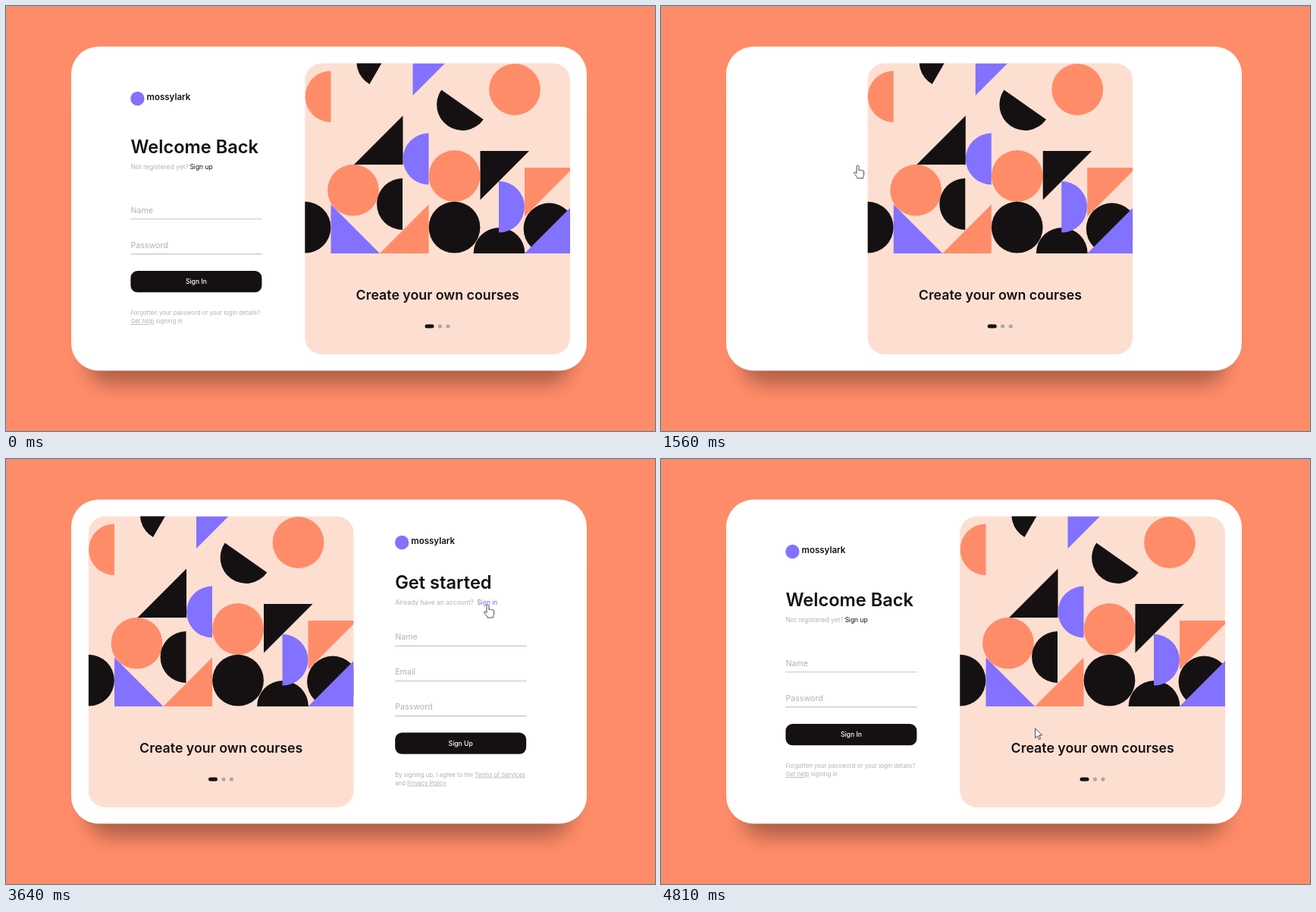
Recreate the animation shown at these times as an HTML page. Size 856 by 560 pixels, loop 4940 ms.

```html
<!DOCTYPE html>
<html lang="en">
<head>
<meta charset="utf-8">
<title>Sign in and sign up</title>
<style>
  html, body { margin: 0; width: 100%; height: 100%; overflow: hidden; background: #ff8c69; }
  svg { display: block; width: 856px; height: 560px; font-family: Inter, "Open Sans", sans-serif; }
  .brand { font-size: 11.5px; font-weight: 600; }
  .title { font-size: 23.6px; font-weight: 600; }
  .slide { font-size: 17.8px; font-weight: 600; }
  .ask, .link { font-size: 8.5px; }
  .field { font-size: 10.7px; }
  .note { font-size: 7.8px; }
  .action { font-size: 8.6px; font-weight: 500; fill: #fff; }
  .ask, .field, .note { fill: #b3b1b3; }
  .brand, .title, .slide { fill: #151112; }
  .action, .slide { text-anchor: middle; }
  .under { text-decoration: underline; }
</style>
</head>
<body>
<svg id="stage" viewBox="0 0 856 560">
  <defs>
    <filter id="blur" x="-10%" y="-20%" width="120%" height="140%">
      <feGaussianBlur stdDeviation="13"/>
    </filter>
    <clipPath id="window"><path d="M394.3 326V97.5a22 22 0 0 1 22-22H722a22 22 0 0 1 22 22V326Z"/></clipPath>
  </defs>
  <rect width="856" height="560" fill="#ff8c69"/>
  <path d="M0 .5H856M.5 0V560" stroke="#cf9a86"/>
  <rect x="107" y="110" width="638" height="388" rx="30" opacity=".32" filter="url(#blur)"/>
  <rect x="86" y="53.5" width="680" height="427" rx="36" fill="#fff"/>
  <g id="login"></g>
  <g id="signup"></g>
  <g id="panel">
    <rect x="394.3" y="75.5" width="349.7" height="383.5" rx="22" fill="#fddfd2"/>
    <g id="art" clip-path="url(#window)"></g>
    <text class="slide" x="569.2" y="387">Create your own courses</text>
    <rect x="552.5" y="419.5" width="12" height="5" rx="2.5" fill="#151112"/>
    <circle cx="572.4" cy="422" r="2.6" fill="#b5a5a2"/>
    <circle cx="583" cy="422" r="2.6" fill="#b5a5a2"/>
  </g>
  <g id="cursor" fill="#fff" stroke="#1b1830" stroke-width=".8" stroke-linejoin="round">
    <path id="arrow" d="M0 0V12.5L3 9.8 5 14.5 7 13.6 5 9H9Z"/>
    <path id="hand" d="M-1.6 1.2a1.5 1.5 0 0 1 3 0V6c.3-.9 2.2-.9 2.5.3.5-.8 2.1-.6 2.3.5.6-.6 1.8-.3 1.8.8v3.9c0 2-1.2 2.8-1.2 5H-.6C-.8 14.5-3 13-4.6 10c-.8-1.4.8-2.2 1.7-1.3L-1.6 10Z"/>
  </g>
</svg>
<script>
const $ = id => document.getElementById(id);
const INK = '#151112', CORAL = '#ff8c69', VIOLET = '#8371ff';
const LOOP = 4940, TICK = 130, LEFT = 164.4, R = 33.9;

// Geometric pattern
const disc = (fill, x, y) => `<circle cx="${x}" cy="${y}" r="${R}" fill="${fill}"/>`;
const tri = (fill, x, y, w, h) => `<path d="M${x} ${y}h${w}L${x} ${y + h}Z" fill="${fill}"/>`;
// Half disc: the left half, turned by an angle
const half = (fill, x, y, turn = 0) =>
  `<path d="M0 ${-R}A${R} ${R} 0 0 0 0 ${R}Z" fill="${fill}" transform="translate(${x} ${y}) rotate(${turn})"/>`;

$('art').innerHTML = [
  half(CORAL, 428.5, 119.3),
  half(INK, 496.4, 73.7, 30),
  tri(VIOLET, 536.5, 75.5, 42.5, 42.5),
  disc(CORAL, 671, 110),
  half(INK, 602, 130, -55),
  tri(INK, 523.5, 209, -64.5, -64.5),
  half(VIOLET, 557.5, 201.5),
  disc(CORAL, 591.5, 224),
  tri(INK, 625.5, 191, 64.5, 64.5),
  tri(CORAL, 684, 213, 64.5, 64.5),
  disc(CORAL, 458, 242.7),
  half(INK, 523, 261),
  disc(INK, 394.5, 291.7),
  tri(VIOLET, 428.5, 326, 64.5, -64.5),
  tri(CORAL, 557.5, 326, -64.5, -64.5),
  disc(INK, 591.5, 291.7),
  disc(INK, 650.5, 326),
  half(VIOLET, 650, 264.7, 180),
  disc(INK, 716.5, 293.5),
  tri(VIOLET, 748.5, 326, -64.5, -64.5)
].join('');

// Forms
const text = (cls, y, str, x = 0) => `<text class="${cls}" x="${LEFT + x}" y="${y}">${str}</text>`;
const under = str => `<tspan class="under">${str}</tspan>`;
const field = (str, y) => text('field', y, str) +
  `<path d="M${LEFT} ${y + 8.2}h173.3" stroke="#c4c2c7" stroke-width="1.1"/>`;

function form(f) {
  return `<circle cx="173.4" cy="${f.logo}" r="9.2" fill="${VIOLET}"/>` +
    text('brand', f.logo + 2, 'mossylark', 21.2) +
    text('title', f.head, f.title) +
    text('ask', f.head + 21, f.ask) +
    text('link', f.head + 21, f.link, f.linkX) +
    f.fields.map((name, i) => field(name, f.first + i * 46.1)).join('') +
    `<rect x="${LEFT}" y="${f.button}" width="173" height="28.3" rx="9" fill="${INK}"/>` +
    text('action', f.button + 17, f.action, 86.5) +
    f.notes.map((note, i) => text('note', f.button + 58 + i * 11, note)).join('');
}

$('login').innerHTML = form({
  logo: 122, head: 194, title: 'Welcome Back',
  ask: 'Not registered yet?', link: 'Sign up', linkX: 78,
  fields: ['Name', 'Password'], first: 272.6, button: 349, action: 'Sign In',
  notes: ['Forgotten your password or your login details?', under('Get help') + ' signing in']
});
$('signup').innerHTML = form({
  logo: 110, head: 171, title: 'Get started',
  ask: 'Already have an account?', link: 'Sign in', linkX: 108,
  fields: ['Name', 'Email', 'Password'], first: 238.2, button: 360.5, action: 'Sign Up',
  notes: ['By signing up, I agree to the ' + under('Terms of Services'), 'and ' + under('Privacy Policy')]
});

const clamp = v => Math.min(1, Math.max(0, v));
const ramp = (t, a, b) => clamp((t - a) / (b - a));

// Ease in and out, as the CSS curve (.42, 0, .58, 1)
function ease(t, a, b) {
  const u = ramp(t, a, b);
  let lo = 0, hi = 1;
  for (let i = 0; i < 24; i++) {
    const s = (lo + hi) / 2, q = 1 - s;
    if (1.26 * s * q * q + 1.74 * s * s * q + s ** 3 < u) lo = s; else hi = s;
  }
  return lo * lo * (3 - 2 * lo);
}

const show = (el, on) => el.setAttribute('visibility', on ? 'visible' : 'hidden');
const move = (el, x, y = 0) => el.setAttribute('transform', `translate(${x.toFixed(2)} ${y.toFixed(2)})`);
const tint = k => `rgb(${[[21, 131], [17, 113], [18, 255]].map(([a, b]) => Math.round(a + (b - a) * k))})`;
const loginLink = $('login').querySelector('.link');
const signupLink = $('signup').querySelector('.link');

function draw(t) {
  const p = ease(t, 1205, 1983) - ease(t, 3602, 4495);
  move($('panel'), -286.5 * p);
  move($('login'), 350 * p);
  move($('signup'), 350 * p);
  show($('login'), p < .5);
  show($('signup'), p >= .5);

  loginLink.setAttribute('fill', tint(ramp(t, 720, 910) - ramp(t, 1130, 1390)));
  signupLink.setAttribute('fill', tint(ramp(t, 2470, 2860) - ramp(t, 3600, 4000)));

  const enter = ease(t, 130, 910), cross = ease(t, 1860, 2345), leave = ease(t, 4180, 4810);
  move($('cursor'), 470 - 210.4 * enter + 376 * cross - 142 * leave,
                    560 - 349.5 * enter - 18 * cross + 162.5 * leave);
  const seen = t >= 260;
  const over = (t >= 780 && t < 1860) || (t >= 2340 && t < 4180);
  show($('hand'), seen && over);
  show($('arrow'), seen && !over);
}

const start = performance.now();
function frame(now) {
  const t = Math.max(0, now - start) % LOOP;
  draw(Math.floor((t + .01) / TICK) * TICK);
  requestAnimationFrame(frame);
}
draw(0);
requestAnimationFrame(frame);
</script>
</body>
</html>
```
